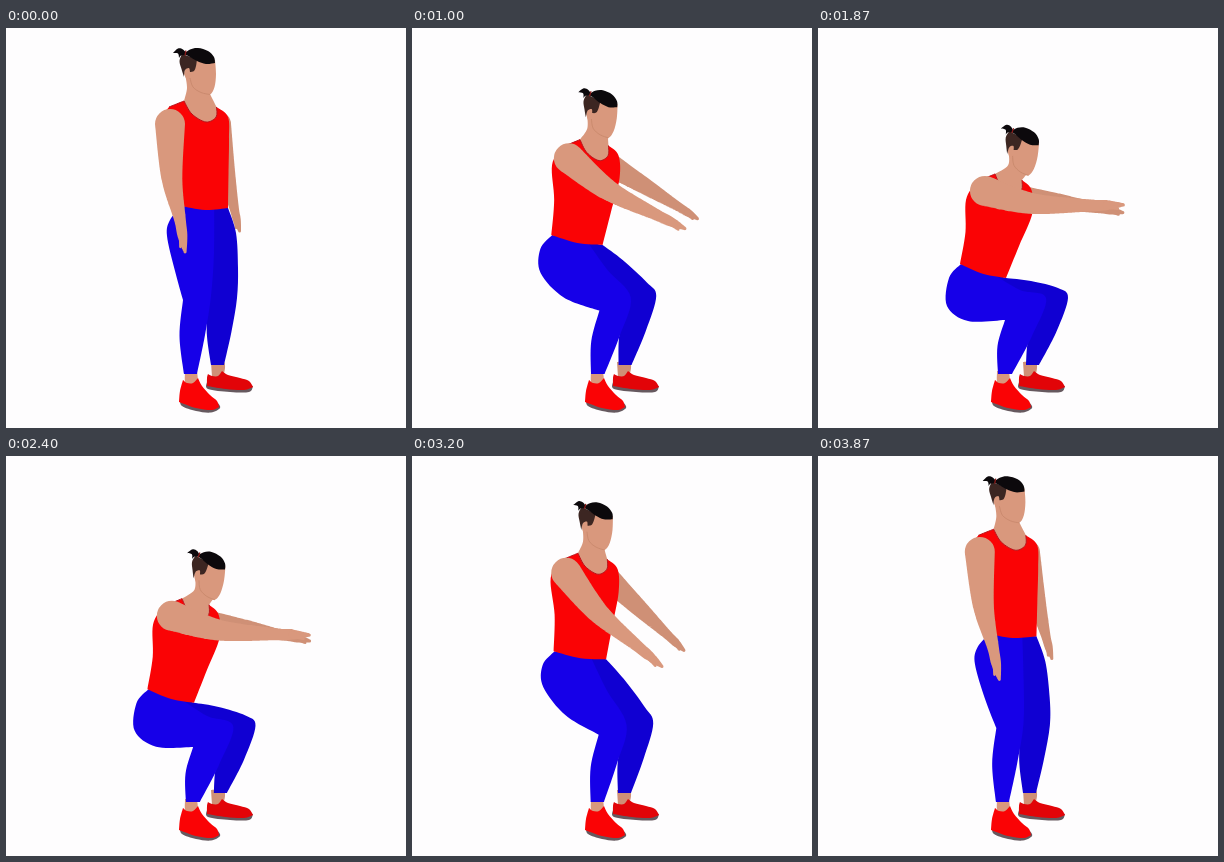
An HTML page with a canvas that plays this animation: 400 by 400 pixels, repeating every 3940 ms.

```html
<!DOCTYPE html>
<html lang="en">
<head>
<meta charset="utf-8">
<title>Squat</title>
<style>
  html, body { margin: 0; width: 100%; height: 100%; overflow: hidden; background: #fefdfe; }
  canvas { display: block; width: 400px; height: 400px; }
</style>
</head>
<body>
<canvas id="stage" width="400" height="400"></canvas>
<script>
const ctx = document.getElementById('stage').getContext('2d');

const LOOP = 3940, STEP = 200 / 3;
const DOWN = 1940, RISE = 2040, UP = 1960;

const SKIN = '#d9987d', SKIN_FAR = '#cf9076', TRIM = '#b8141c';
const RED = '#fa0305', RED_FAR = '#e20408';
const BLUE = '#1600e8', BLUE_FAR = '#1000d2';
const HAIR = '#0c090c', SIDE = '#3c2622', SOLE = '#66595f';

// Each body point glides on one curve: standing, bend, deep squat.
const paths = {
  neck: [[178, 73], [154, 73], [177, 146]],
  back: [[176, 178], [130, 174], [143, 236]],
  front: [[222, 180], [188, 180], [188, 250]],
  seat: [[161, 208], [122, 208], [129, 278]],
  under: [[169, 243], [151, 243], [150, 293]],
  kneeBack: [[177, 272], [190, 272], [187, 292]],
  knee: [[205, 268], [209, 269], [228, 270]],
  thigh: [[208, 225], [185, 219], [202, 262]],
  farThigh: [[230, 205], [204, 209], [213, 253]],
  farTop: [[232, 240], [228, 249], [240, 260]],
  farKnee: [[231, 270], [239, 265], [250, 270]],
  farBack: [[201, 282], [208, 276], [215, 296]]
};

const lerp = (a, b, k) => a + (b - a) * k;
const add = (p, x, y) => [p[0] + x, p[1] + y];
const mix = (p, q, k) => p.map((v, i) => lerp(v, q[i], k));
const smoother = s => s * s * s * (10 + s * (6 * s - 15));

function poseAt(r) {
  const pose = { r, sink: r * r };
  for (const name in paths) {
    const [a, b, c] = paths[name];
    pose[name] = mix(mix(a, b, r), mix(b, c, r), r);
  }
  return pose;
}

// Smooth runs of points, with a corner wherever two runs meet.
function trace(runs) {
  ctx.beginPath();
  runs.forEach((pts, k) => {
    if (k) ctx.lineTo(...pts[0]); else ctx.moveTo(...pts[0]);
    for (let i = 0; i < pts.length - 1; i++) {
      const p = pts[i], q = pts[i + 1], o = pts[i - 1] || p, n = pts[i + 2] || q;
      ctx.bezierCurveTo(p[0] + (q[0] - o[0]) / 6, p[1] + (q[1] - o[1]) / 6,
        q[0] - (n[0] - p[0]) / 6, q[1] - (n[1] - p[1]) / 6, q[0], q[1]);
    }
  });
}

function shape(color, ...runs) {
  trace(runs);
  ctx.fillStyle = color;
  ctx.fill();
}

function line(color, width, pts) {
  trace([pts]);
  ctx.strokeStyle = color;
  ctx.lineWidth = width;
  ctx.stroke();
}

const spline = (o, p, q, n, u) =>
  p + u * ((q - o) + u * ((2 * o - 5 * p + 4 * q - n) + u * (3 * (p - q) + n - o))) / 2;

// A tapering limb through points [x, y, radius].
function limb(color, pts) {
  ctx.beginPath();
  for (let i = 0; i < pts.length - 1; i++) {
    const p = pts[i], q = pts[i + 1], o = pts[i - 1] || p, n = pts[i + 2] || q;
    for (let k = 0; k <= 40; k++) {
      const [x, y, r] = p.map((_, d) => spline(o[d], p[d], q[d], n[d], k / 40));
      ctx.moveTo(x + r, y);
      ctx.arc(x, y, r, 0, 7);
    }
  }
  ctx.fillStyle = color;
  ctx.fill();
}

// Angles are degrees forward from hanging straight down.
function reach(p, angle, length) {
  const a = angle * Math.PI / 180;
  return add(p, Math.sin(a) * length, Math.cos(a) * length);
}

function arm(color, size, shoulder, upper, fore, hand) {
  const elbow = reach(shoulder, ...upper);
  const wrist = reach(elbow, ...fore);
  const palm = reach(wrist, hand[0], hand[1] * .5);
  const tip = reach(palm, hand[0], hand[1] * .5);
  const thumb = reach(palm, hand[0] - 18, hand[1] * .35);
  limb(color, [[...shoulder, 15 * size], [...elbow, 10.5 * size], [...wrist, 6 * size],
    [...palm, 5 * size], [...tip, 1.6]]);
  limb(color, [[...palm, 3.5 * size], [...thumb, 1.4]]);
}

function nearArm({ r, neck }) {
  const k = r ** 1.25;
  arm(SKIN, 1, add(neck, -14 + 4 * r, 23 - 6 * r),
    [lerp(2, 75, k), lerp(54, 48, k)],
    [lerp(11, 88, k), lerp(41, 58, k)],
    [lerp(9, 91, k), 34]);
}

function farArm({ r, neck }) {
  const k = r ** 1.25;
  arm(SKIN_FAR, .8, add(neck, 35 - 12 * r, 23),
    [lerp(9, 83, k), lerp(51, 41, k)],
    [lerp(12, 81, k), lerp(34, 41, k)],
    [lerp(13, 80, k), 24]);
}

function shoes() {
  shape(SKIN_FAR, [[205, 334], [218, 334], [217, 347], [206, 349]]);
  shape(SOLE, [[201, 354], [202, 361], [224, 364], [243, 364], [247, 358]]);
  shape(RED_FAR, [[202, 346], [206, 348], [212, 348], [216, 343]],
    [[216, 343], [222, 347], [234, 350], [243, 353], [247, 359]],
    [[247, 359], [238, 362], [220, 361], [201, 358]], [[201, 358], [201, 350], [202, 346]]);
  shape(SKIN, [[179, 343], [191, 343]], [[191, 343], [191, 355], [180, 357], [179, 343]]);
  shape(SOLE, [[174, 371], [176, 378], [190, 383], [205, 384.5], [214, 380], [212, 375]]);
  shape(RED, [[177, 352], [181, 355], [187, 355], [192, 350]],
    [[192, 350], [196, 358], [204, 367], [211, 373], [213, 379]],
    [[213, 379], [206, 382], [190, 380], [173, 374]], [[173, 374], [174, 363], [177, 352]]);
}

function legs(p) {
  const { back, front, sink } = p;
  const heel = [178 + 2 * sink, 346], toe = [191 + 3 * sink, 346];
  const farHeel = [205 + 3 * sink, 337], farToe = [218 + 3 * sink, 337];
  const shin = (knee, foot) => add(mix(knee, foot, .5), 1 + 2 * sink, 0);
  const calf = (knee, foot, out) => add(mix(knee, foot, .5), -out, -1);

  shape(BLUE_FAR, [front, p.farThigh, p.farTop, p.farKnee, shin(p.farKnee, farToe), farToe],
    [farToe, farHeel], [farHeel, calf(p.farBack, farHeel, 2), p.farBack],
    [p.farBack, mix(back, front, .5)]);
  shape(BLUE, [back, add(back, -12, 14), p.seat, p.under, p.kneeBack],
    [p.kneeBack, calf(p.kneeBack, heel, 4), heel], [heel, toe],
    [toe, shin(p.knee, toe), p.knee, p.thigh, mix(back, front, .7)]);
}

function torso({ r, neck, back, front }) {
  const w = 44 - 7.5 * r;
  const left = add(neck, -15 - 4 * r, 6 + 2 * r), right = add(neck, w, 16);
  const side = add(left, -10, 18), chest = add(right, 1, 23);
  const scoop = [neck, add(neck, w * .18, 13), add(neck, w * .5, 21),
    add(neck, w * .73, 16), add(neck, w * .74, 6)];
  shape(RED, [left, neck], [scoop[4], right, chest, mix(chest, front, .5), front],
    [front, add(mix(front, back, .5), 0, 3), add(back, -1, 0)],
    [add(back, -1, 0), add(mix(side, back, .5), 2, 0), side, left]);
  return { scoop, left };
}

const PIVOT = [188.5, 29];

function head(p, { scoop, left }) {
  const rise = p.neck.map((v, i) => v - paths.neck[0][i]);
  const m = new DOMMatrix()
    .translate(PIVOT[0] + rise[0] + 15 * p.sink, PIVOT[1] + rise[1] + 6 * p.sink)
    .rotate(10 * p.r)
    .scale(1 - .05 * p.r, 1)
    .translate(-PIVOT[0], -PIVOT[1]);
  const at = (x, y) => {
    const q = m.transformPoint({ x, y });
    return [q.x, q.y];
  };

  shape(SKIN, [at(179, 46), at(181, 60), scoop[0]], scoop, [scoop[4], at(203, 64)]);
  line(TRIM, 1, scoop);
  line(TRIM, 1, [left, scoop[0]]);

  ctx.save();
  ctx.transform(m.a, m.b, m.c, m.d, m.e, m.f);
  shape(SKIN, [[180, 30], [209, 32]],
    [[209, 32], [210, 46], [208.5, 59], [204, 66.5], [197, 65], [187, 59], [181, 52], [178, 46]]);
  line('#c58569', .7, [[184, 50], [187, 59], [195, 64.5], [204, 66.5]]);
  shape(SIDE, [[176, 26], [173.5, 33], [175.5, 41], [178, 49]],
    [[178, 49], [179, 42], [183, 40], [184, 44]],
    [[184, 44], [188, 43], [190, 38], [191, 31]]);
  shape(HAIR, [[178, 26], [184, 21.5], [192, 20], [202, 23], [208, 29], [209, 35]],
    [[209, 35], [200, 36], [191, 33], [184, 29], [178, 26]]);
  shape(HAIR, [[181, 26], [177, 21.5], [172, 20.5], [167, 25]],
    [[167, 25], [172, 25.5], [173, 30]], [[173, 30], [175, 27.5], [180, 27]]);
  line('#8c1c1a', 1.3, [[180, 22.5], [179, 27.5]]);
  ctx.restore();
}

function draw(t) {
  const s = t < DOWN ? t / DOWN : t < RISE ? 1 : 1 - (t - RISE) / UP;
  const p = poseAt(Math.sqrt(smoother(s)));
  ctx.fillStyle = '#fefdfe';
  ctx.fillRect(0, 0, 400, 400);
  farArm(p);
  shoes();
  legs(p);
  head(p, torso(p));
  nearArm(p);
}

const start = performance.now();
function tick() {
  const t = (performance.now() - start) % LOOP;
  draw(Math.min(58, Math.floor((t + 4) / STEP)) * STEP);
  requestAnimationFrame(tick);
}
tick();
</script>
</body>
</html>
```
